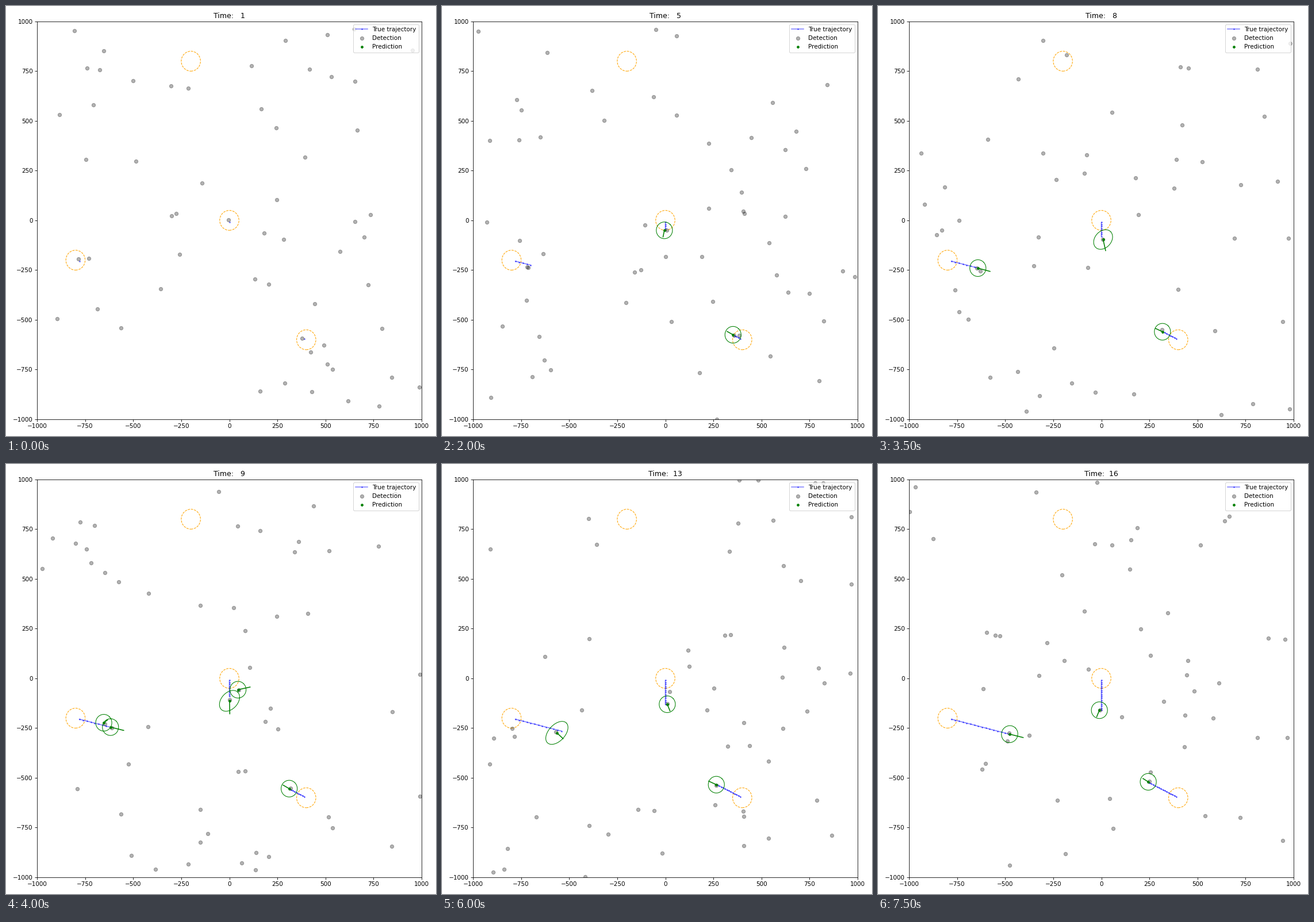
These frames come from a looping animation (748 by 748 pixels, 8 s). A matplotlib script:

```python
import numpy as np
import matplotlib.pyplot as plt
from matplotlib.animation import FuncAnimation
from matplotlib.patches import Circle

SIZE, DPI = 748, 74.8
FRAMES, INTERVAL = 16, 500
LEFT, RIGHT, TOP, BOTTOM = 54, 723, 26.75, 719
RADIUS = 42
SPLIT_TIME = 9
EMPTY_BIRTH = (-200, 800)


class Target:
    """Straight mover whose estimate sways and loosens around one moment."""

    def __init__(self, start, speed, birth, sway, loose, spread, drift, split):
        self.start, self.speed = np.array(start), np.array(speed)
        self.birth, self.sway = birth, sway
        self.loose, self.spread = loose, spread
        self.drift = np.array(drift)
        self.split = split and np.array(split)

    def truth(self, t):
        return self.start + self.speed * t

    def track(self, t, offset, radius):
        return self.truth(t) + offset, 3.3 * self.speed + 1.4 * offset, radius

    def tracks(self, t):
        """Position, velocity arrow and major radius of each estimate."""
        bump = np.exp(-((t - self.loose) / 1.7) ** 2)
        sway = np.array([self.sway * np.cos(np.pi * (t - 1) / 3), 0])
        found = [self.track(t, sway + self.drift * bump,
                            RADIUS + self.spread * bump)]
        if t == SPLIT_TIME and self.split is not None:
            found.append(self.track(t, self.split, RADIUS))
        return found


TARGETS = [
    Target((0, 0), (0, -10), 4, 10, 9, 19, (6, -23), (45, 33)),
    Target((-800, -200), (20, -5), 6, -4, 13, 28, (-20, -9), (-33, 22)),
    Target((400, -600), (-10, 5), 4, -4, 11, 0, (-3, 3), None),
]


def ellipse(centre, major):
    """Outline of an uncertainty ellipse tilted by 45 degrees."""
    a = np.linspace(0, 2 * np.pi, 73)
    u, v = major * np.cos(a), RADIUS * np.sin(a)
    return centre + np.column_stack([u - v, u + v]) / np.sqrt(2)


def show(line, parts):
    """Draw several polylines with one artist."""
    gap = np.full((1, 2), np.nan)
    pts = np.vstack([gap] + [np.vstack([p, gap]) for p in parts])
    line.set_data(*pts.T)


fig = plt.figure(figsize=(SIZE / DPI, SIZE / DPI), dpi=DPI, facecolor="white")
ax = fig.add_axes([LEFT / SIZE, 1 - BOTTOM / SIZE,
                   (RIGHT - LEFT) / SIZE, (BOTTOM - TOP) / SIZE])
ax.set(xlim=(-1000, 1000), ylim=(-1000, 1000),
       xticks=range(-1000, 1001, 250), yticks=range(-1000, 1001, 250))
title = ax.set_title("")

for centre in [*(g.start for g in TARGETS), EMPTY_BIRTH]:
    ax.add_patch(Circle(centre, 50, fill=False, ec="orange", ls="--", lw=1))

truth, = ax.plot([], [], "b.-", ms=3, alpha=0.5, label="True trajectory")
detections, = ax.plot([], [], "ko", alpha=0.3, label="Detection")
estimates, = ax.plot([], [], "g.", ms=7, label="Prediction")
arrows, = ax.plot([], [], "g-", lw=1.5)
outlines, = ax.plot([], [], "g-", lw=1)
ax.legend(loc="upper right")


def update(i):
    t = i + 1
    title.set_text(f"Time: {t:3d}")
    show(truth, [[g.truth(k) for k in range(1, t + 1)] for g in TARGETS])

    rng = np.random.default_rng(40 + t)
    points = list(rng.uniform(-1000, 1000, (rng.integers(50, 58), 2)))
    tracks = []
    for g in TARGETS:
        if t < g.birth:
            points.append(g.truth(t) + rng.normal(0, 12, 2))
            continue
        found = g.tracks(t)
        points += [pos + rng.normal(0, 4, 2) for pos, _, _ in found]
        tracks += found

    detections.set_data(*np.array(points).T)
    show(estimates, [[pos] for pos, _, _ in tracks])
    show(arrows, [[pos, pos + vel] for pos, vel, _ in tracks])
    show(outlines, [ellipse(pos, radius) for pos, _, radius in tracks])
    return title, truth, detections, estimates, arrows, outlines


anim = FuncAnimation(fig, update, frames=FRAMES, interval=INTERVAL,
                     repeat=True, repeat_delay=0, blit=False)
plt.show()
```
